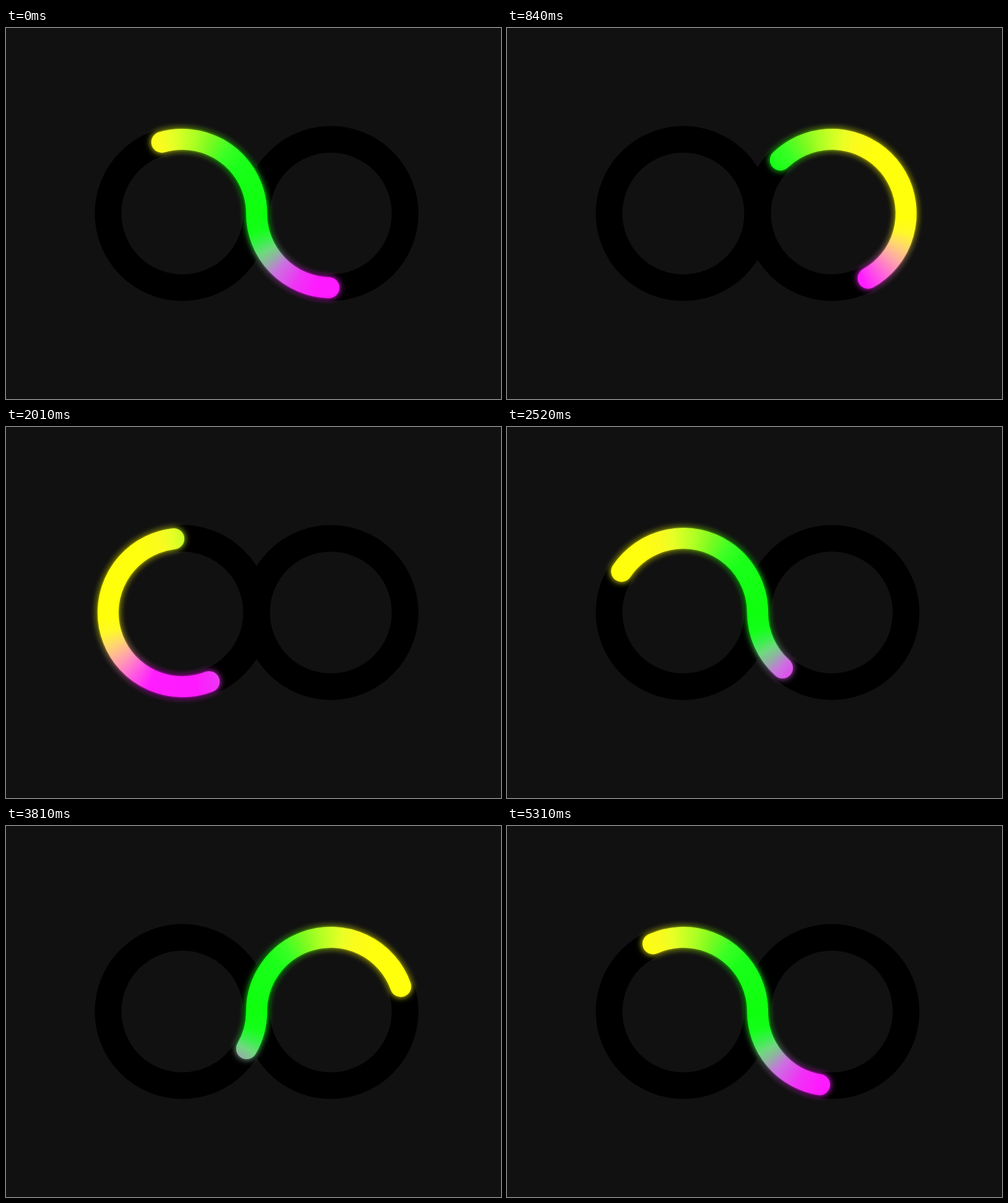
Recreate the animation shown at these times as an HTML page with a canvas. Size 800x600 px, loop 5.34 s.

```html
<!DOCTYPE html>
<html lang="en">
<head>
<meta charset="utf-8">
<title>Infinity loader</title>
<style>
  html, body { margin: 0; width: 100%; height: 100%; overflow: hidden; background: #111; }
  canvas { display: block; }
</style>
</head>
<body>
<canvas id="stage" width="800" height="600"></canvas>
<script>
const STEP_MS = 30;
const STEPS = 90;          // steps in one lap; the step at the seam is skipped
const GAP = 4.3;           // degrees of travel spent at the crossing
const LAP = 720 + GAP;
const LENGTH = 194.6;      // ribbon length in degrees
const RADIUS = 120;
const RAD = Math.PI / 180;

// Colours along a lobe: degrees travelled from the crossing, then RGB.
const STOPS = [
  [0, '14,255,14'], [14, '20,255,25'], [23, '60,238,78'], [30, '110,218,125'],
  [38, '148,175,165'], [47, '204,112,225'], [64, '240,50,245'], [80, '255,26,255'],
  [115, '255,30,255'], [130, '255,100,220'], [143, '255,165,170'], [155, '255,215,110'],
  [165, '255,248,40'], [176, '255,255,10'], [235, '255,255,14'], [252, '250,250,30'],
  [262, '232,255,38'], [270, '205,255,36'], [280, '170,255,35'], [290, '128,250,32'],
  [305, '60,255,36'], [320, '25,255,25'], [360, '14,255,14']
];

const ctx = document.getElementById('stage').getContext('2d');
const layer = document.createElement('canvas');
layer.width = 800;
layer.height = 600;
const ribbon = layer.getContext('2d');
ribbon.lineWidth = 34;
ribbon.lineCap = 'round';

// origin: angle of the crossing; turn: 1 clockwise, -1 anticlockwise
function makeLobe(x, origin, turn, start) {
  const paint = ribbon.createConicGradient(origin * RAD, x, 300);
  for (const [deg, rgb] of STOPS) {
    const at = deg / 360;
    paint.addColorStop(turn > 0 ? at : 1 - at, `rgb(${rgb})`);
  }
  return { x, origin, turn, start, paint };
}

const lobes = [makeLobe(525, 180, -1, 0), makeLobe(285, 0, 1, 360 + GAP)];

function strokeLobe(lobe, tail, head) {
  const from = Math.max(0, tail - lobe.start);
  const to = Math.min(360, head - lobe.start);
  if (from >= to) return;
  const angle = deg => (lobe.origin + lobe.turn * deg) * RAD;
  ribbon.strokeStyle = lobe.paint;
  ribbon.beginPath();
  ribbon.arc(lobe.x, 300, RADIUS, angle(from), angle(to), lobe.turn < 0);
  ribbon.stroke();
}

function drawTracks() {
  ctx.fillStyle = '#111';
  ctx.fillRect(0, 0, 800, 600);
  ctx.strokeStyle = '#000';
  ctx.lineWidth = 43;
  for (const { x } of lobes) {
    ctx.beginPath();
    ctx.arc(x, 300, RADIUS, 0, 2 * Math.PI);
    ctx.stroke();
  }
}

function render(time) {
  const tick = Math.floor(time / STEP_MS + 0.01);
  const step = 1 + (tick + 10) % (STEPS - 1);
  const head = step / STEPS * LAP;
  const tail = head - LENGTH;

  ribbon.clearRect(0, 0, 800, 600);
  for (const lobe of lobes) {
    strokeLobe(lobe, tail, head);
    strokeLobe(lobe, tail + LAP, head + LAP);
  }

  drawTracks();
  ctx.filter = 'blur(5.5px)';
  ctx.drawImage(layer, 0, 0);
  ctx.filter = 'none';
  ctx.drawImage(layer, 0, 0);
}

const begin = performance.now();
function loop() {
  render(performance.now() - begin);
  requestAnimationFrame(loop);
}
loop();
</script>
</body>
</html>
```
